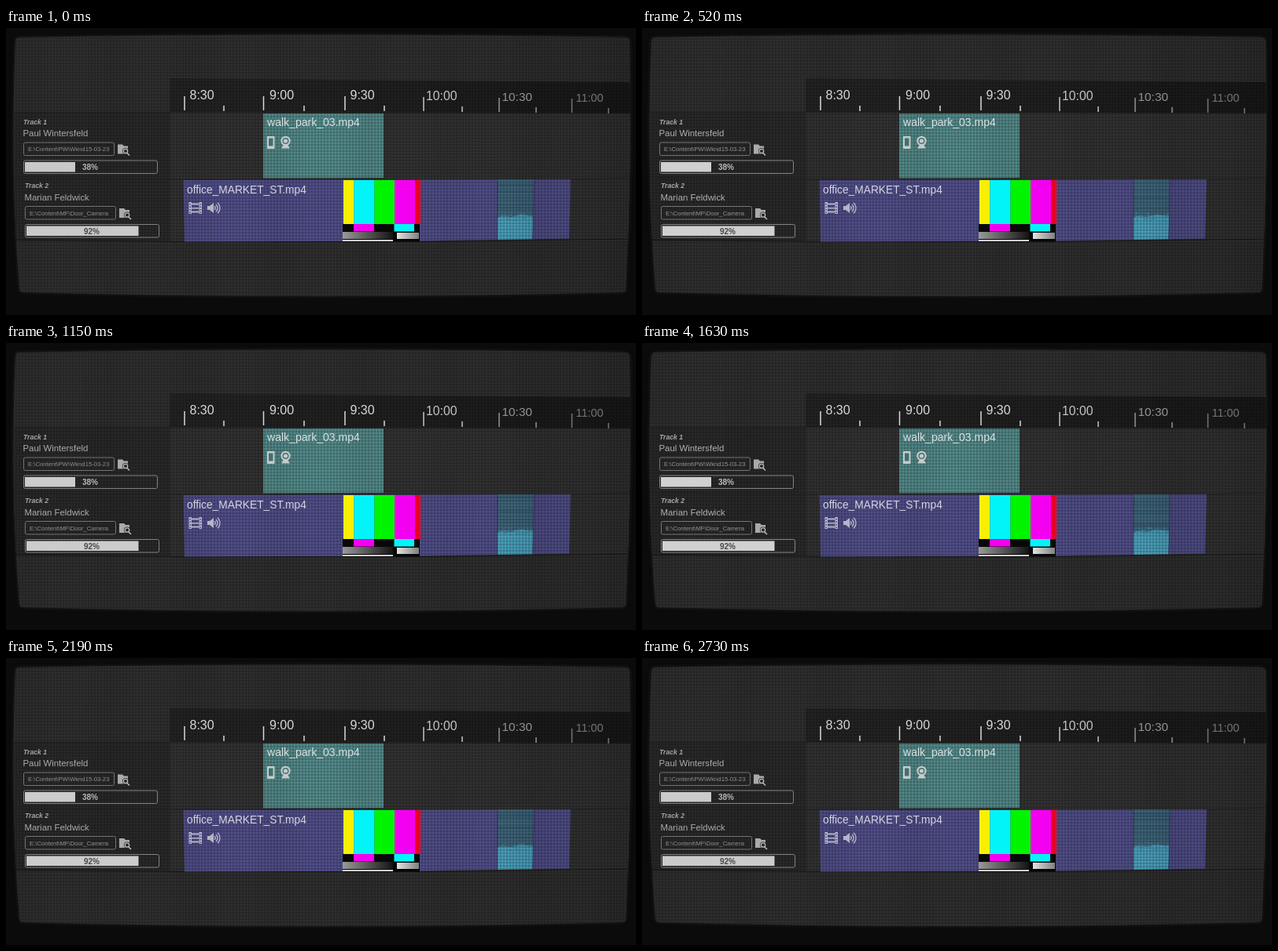
Animation of 801x366 px, one loop 2.8 s. Source, as an HTML page with a canvas:

```html
<!DOCTYPE html>
<html>
<head>
<meta charset="utf-8">
<style>
  html, body { margin: 0; width: 100%; height: 100%; overflow: hidden; background: #0b0b0b; }
  canvas { display: block; }
</style>
</head>
<body>
<canvas id="stage" width="801" height="366"></canvas>
<script>
const ctx = document.getElementById('stage').getContext('2d');
const LOOP = 2800, STEPS = 41;
const FONT = '"Liberation Sans", Arial, sans-serif';
const hash = n => { const v = Math.sin(n * 127.1 + 11.7) * 43758.5453; return v - Math.floor(v); };

function rect(x, y, w, h, color) {
  ctx.fillStyle = color;
  ctx.fillRect(x, y, w, h);
}
function trace(points) {
  ctx.beginPath();
  for (let i = 0; i < points.length; i += 2) ctx.lineTo(points[i], points[i + 1]);
}
function poly(color, ...points) {
  trace(points);
  ctx.fillStyle = color;
  ctx.fill();
}
function stroke(color, width) {
  ctx.strokeStyle = color;
  ctx.lineWidth = width;
  ctx.stroke();
}
function line(color, width, ...points) {
  trace(points);
  stroke(color, width);
}
function text(str, x, y, size, color, style = '') {
  ctx.font = `${style} ${size}px ${FONT}`;
  ctx.fillStyle = color;
  ctx.fillText(str, x, y);
}
function box(x, y, w, h, r) {
  ctx.beginPath();
  ctx.roundRect(x, y, w, h, r);
}
function arc(x, y, r, from = 0, to = 7) {
  ctx.beginPath();
  ctx.arc(x, y, r, from, to);
}
function circle(x, y, r, color) {
  arc(x, y, r);
  ctx.fillStyle = color;
  ctx.fill();
}
function ramp(x, w, ...colors) {
  const g = ctx.createLinearGradient(x, 0, x + w, 0);
  colors.forEach((c, i) => g.addColorStop(i / (colors.length - 1), c));
  return g;
}

// Dot mask of the tube
const tile = document.createElement('canvas');
tile.width = tile.height = 4;
const tileCtx = tile.getContext('2d');
tileCtx.fillStyle = 'rgba(0,0,0,.13)';
tileCtx.fillRect(0, 0, 2, 4);
tileCtx.fillRect(0, 0, 4, 2);
const mask = ctx.createPattern(tile, 'repeat');

function screenPath() {
  ctx.beginPath();
  ctx.moveTo(17, 12);
  ctx.quadraticCurveTo(400, 5, 788, 12);
  ctx.quadraticCurveTo(793, 13, 793, 18);
  ctx.quadraticCurveTo(796, 180, 788, 333);
  ctx.quadraticCurveTo(788, 337, 782, 337);
  ctx.quadraticCurveTo(400, 347, 22, 337);
  ctx.quadraticCurveTo(17, 337, 17, 332);
  ctx.quadraticCurveTo(5, 180, 12, 17);
  ctx.quadraticCurveTo(12, 12, 17, 12);
}

function backdrop() {
  rect(0, 0, 801, 366, '#0b0b0b');
  screenPath();
  ctx.fillStyle = '#2f2f2f';
  ctx.shadowColor = '#222';
  ctx.shadowBlur = 4;
  ctx.fill();
  ctx.shadowBlur = 0;
  ctx.clip();
  rect(208, 108, 590, 164, '#323232');
  rect(0, 108, 209, 164, '#292929');
  poly(ramp(208, 592, '#242424', '#202020', '#191919'), 208, 64, 500, 67, 800, 69, 800, 109, 208, 108);
  line('#202020', 1, 0, 107.5, 208, 107.5);
  line('#252525', 1, 10, 191, 226, 193, 718, 193, 800, 191);
  line('#191919', 1, 10, 270, 226, 272.5, 526, 272.5, 800, 269);
  poly('#514f8a', 225.5, 194, 718, 193, 716, 268.5, 526, 271.5, 227, 272.5);
  poly('#558c8c', 327, 109, 480, 109, 480, 191, 327, 191.5);
}

function signalBlock(step) {
  rect(625, 193, 46, 76.5, '#41697f');
  poly('#4ba3c0', 624, 242, 630, 240, 642, 241, 654, 238, 671, 240, 669, 269, 624, 270);
  for (let y = 195; y < 269; y += 2) {
    const n = hash(y + step * 83);
    if (n > .45) rect(625, y, 46, 1, `rgba(${y < 239 ? '20,45,70' : '110,200,220'},${(n - .4) * .5})`);
  }
  for (let i = 0; i < 40; i++) {
    const a = hash(i + step * 59);
    rect(626 + a * 43, 235 + hash(i * 3 + step * 31) * 10, 2, 1, '#468ca8');
  }
  line('#343c60', 1, 625, 194, 624.5, 270);
  line('#3d3b70', 1, 671.5, 194, 670, 270);
}

function tubeTexture(step) {
  ctx.save();
  ctx.translate(step % 2, (step >> 1) % 2);
  rect(-4, -4, 809, 374, mask);
  ctx.restore();
  // Soft interference bands
  for (let i = 0; i < 8; i++) {
    const x = i * 108 - 20 + hash(i + step) * 6;
    rect(x, 0, 80, 366, ramp(x, 80, 'rgba(0,0,0,0)', 'rgba(0,0,0,.05)', 'rgba(0,0,0,0)'));
  }
  rect(560, 0, 241, 366, ramp(560, 241, 'rgba(0,0,0,0)', 'rgba(0,0,0,.1)'));
}

function colorBars() {
  const xs = [429, 442.5, 468.5, 494, 520, 527];
  ['#f8f000', '#00f4f8', '#00f400', '#f400f0', '#ec0020'].forEach((c, i) =>
    rect(xs[i], 194, xs[i + 1] - xs[i], 56, c));
  rect(428, 250, 98, 22.5, '#080808');
  rect(442, 250, 26, 9.5, '#f400f0');
  rect(493.5, 250, 25.5, 9.5, '#00f4f8');
  rect(428, 260, 64, 9, ramp(428, 64, '#999', '#141414'));
  rect(428, 270, 64, 2, '#d0d0d0');
  rect(497, 261, 28, 8, ramp(497, 28, '#e4e4e4', '#808080'));
}

function ruler() {
  const labels = [
    ['8:30', 233.5, 91, 16, '#d8d8d8', 227, 277], ['9:00', 335, 91, 16, '#d8d8d8', 327.5, 379],
    ['9:30', 437.5, 91, 16, '#d8d8d8', 431, 481], ['10:00', 534, 92, 15.8, '#c4c4c4', 531, 580],
    ['10:30', 630.5, 93, 15.4, '#929292', 627, 674], ['11:00', 724.5, 94, 14.4, '#747474', 719.5, 766]];
  for (const [label, x, y, size, color, major, minor] of labels) {
    text(label, x, y, size, color);
    rect(major - .75, y - 4, 1.5, 18, color);
    rect(minor - .75, y + 8, 1.5, 7, color);
  }
}

function folder(x, y) {
  poly('#aaa', x, y, x + 6, y, x + 8, y + 2, x + 13, y + 2, x + 13, y + 12, x, y + 12);
  circle(x + 10, y + 8.5, 4, '#262626');
  arc(x + 10, y + 8.5, 2.7);
  stroke('#bbb', 1.3);
  line('#bbb', 1.5, x + 12, y + 11, x + 15, y + 14);
}

function track(x, y, title, name, path, percent, tone) {
  const gray = v => `rgb(${v * tone},${v * tone},${v * tone})`;
  text(title, x, y + 14, 8.6, gray(165), 'italic bold');
  text(name, x - .5, y + 29.5, 11.4, gray(172));
  box(x + .5, y + 37.5, 115, 16.5, 2);
  stroke(gray(115), 1);
  text(path, x + 6, y + 48.5, 7.7, gray(145));
  folder(x + 120, y + 40);
  box(x + .5, y + 60.5, 170, 16.5, 2);
  stroke(gray(130), 1);
  const high = percent > 50;
  rect(x + 2, y + 62.5, high ? 142.5 : 64, 12.5, gray(205));
  text(percent + '%', x + 75, y + 72.5, 10, high ? '#484848' : gray(185), 'bold');
}

function clipIcons() {
  const pale = '#c4cccc', teal = '#42706f';
  rect(332, 138, 9.5, 16, pale);
  rect(334, 140.5, 5.5, 10, teal);
  circle(355.5, 144, 6.2, pale);
  circle(355.5, 144, 4, teal);
  circle(355.5, 144, 2.6, pale);
  poly(pale, 353, 149, 358, 149, 361, 153.5, 350, 153.5);

  const film = '#b6b4c8', hole = '#4a477e';
  rect(232.5, 222, 3.5, 15, film);
  rect(245.5, 222, 3.5, 15, film);
  rect(236, 223.5, 9.5, 2, film);
  rect(236, 229, 9.5, 1.5, film);
  rect(236, 233.5, 9.5, 2, film);
  for (let y = 224; y < 236; y += 3.5) {
    rect(233.5, y, 1.5, 1.5, hole);
    rect(246.5, y, 1.5, 1.5, hole);
  }
  poly(film, 256, 227, 259, 227, 264, 223, 264, 236, 259, 232, 256, 232);
  for (const r of [3, 6, 9]) {
    arc(263, 229.5, r, -.85, .85);
    stroke(film, 1.4);
  }
}

function draw(step) {
  ctx.save();
  backdrop();
  signalBlock(step);
  tubeTexture(step);
  ctx.filter = 'blur(.4px)';
  colorBars();
  ruler();
  text('walk_park_03.mp4', 332, 125, 14.05, '#d8e0e0');
  text('office_MARKET_ST.mp4', 230, 211, 13.75, '#d6d4e2');
  clipIcons();
  const tone = .96 + hash(step + 5) * .08;
  track(22, 108.5, 'Track 1', 'Paul Wintersfeld', 'E:\\Content\\PW\\Wknd15-03-23', 38, tone);
  track(24, 190, 'Track 2', 'Marian Feldwick', 'E:\\Content\\MF\\Door_Camera', 92, tone);
  ctx.restore();
}

let shown = -1;
function tick() {
  const step = Math.floor(performance.now() % LOOP / LOOP * STEPS);
  if (step !== shown) draw(shown = step);
  requestAnimationFrame(tick);
}
tick();
</script>
</body>
</html>
```
